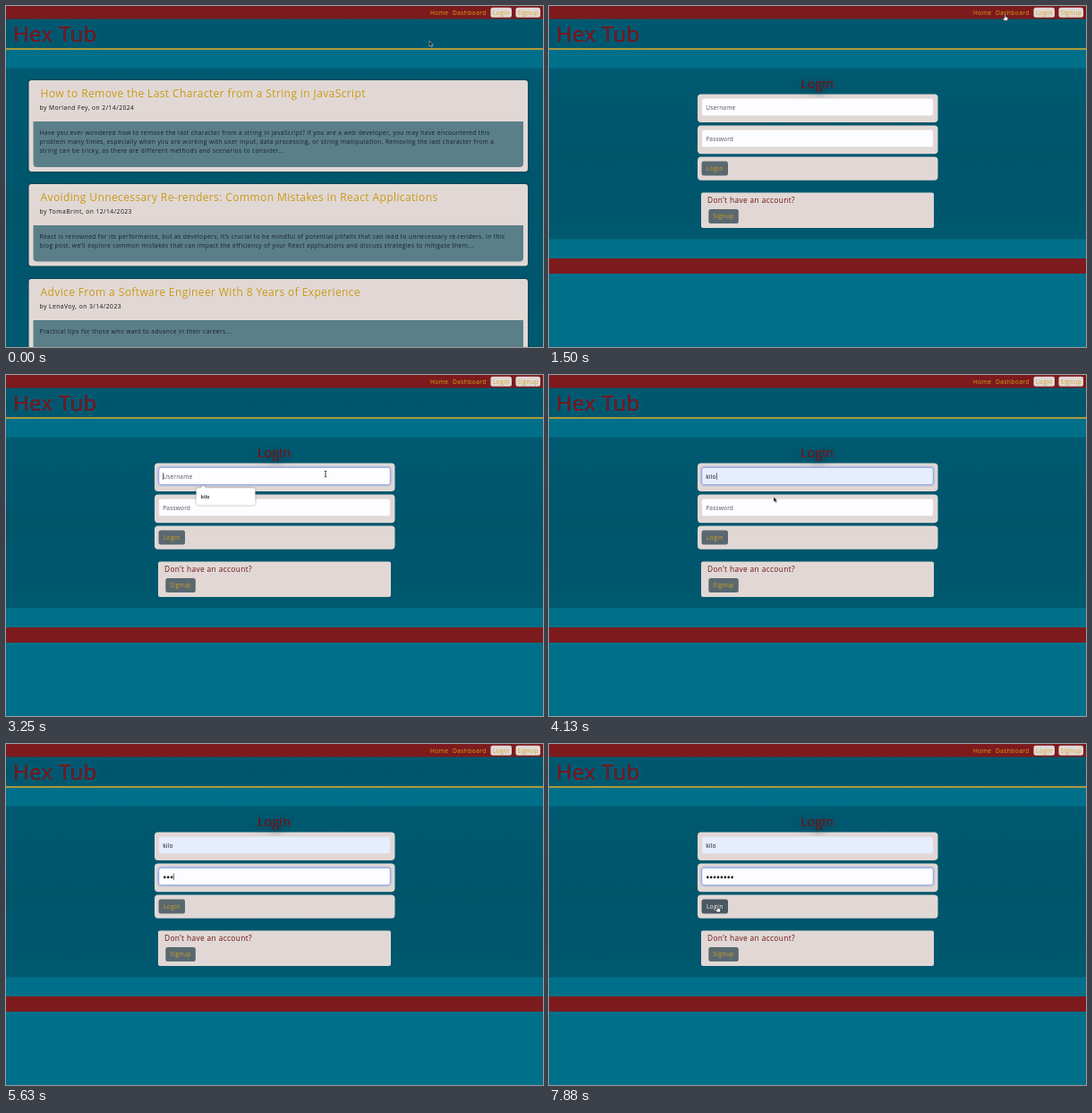
An HTML page for the animation above (8000 ms loop, 600 by 381 pixels).

```html
<!DOCTYPE html>
<html lang="en">
<head>
<meta charset="utf-8">
<title>Blog login</title>
<style>
  html, body { margin: 0; width: 100%; height: 100%; overflow: hidden; background: #00708a; }
  svg { display: block; width: 100%; height: 100%; }
  text { font: 6.67px "Open Sans", "Noto Sans", sans-serif; letter-spacing: .38px; white-space: pre; }
  .gold { fill: #d6a31f; }
  .red { fill: #7d1a1d; }
  .card { fill: #e1d8d5; }
  .post { filter: drop-shadow(0 .8px 1.2px #0008); }
  .title { font-size: 12px; letter-spacing: .39px; fill: #c99a17; }
  .by { letter-spacing: .5px; fill: #111; }
  .body { fill: #14202a; }
  .glow { fill: #88141a; filter: drop-shadow(.6px .6px .6px #0a1a28) drop-shadow(0 0 5px #0a6688); }
  .brand { font-size: 24px; }
  .heading { font-size: 14px; filter: drop-shadow(.3px .3px .4px #0a1a28) drop-shadow(0 2px 4px #00394d); }
  .ask { font-size: 8.33px; fill: #6d1013; }
  .btn { fill: #596870; }
  .field { fill: #fdfdff; stroke: #d5d3d8; stroke-width: .5; }
  .field.filled { fill: #e6edfc; }
  .field.focus { stroke: #8fa6dc; stroke-width: 1; filter: drop-shadow(0 0 1px #7f9be0); }
  .hint { fill: #50565c; letter-spacing: .12px; }
  .value { fill: #111; letter-spacing: .12px; }
  .menu { fill: #fff; filter: drop-shadow(0 .5px 1px #0006); }
  .menuText { font-size: 5.6px; font-weight: 600; letter-spacing: 0; fill: #111; }
  .hover .btn { fill: #4a5862; }
  .hover .gold { fill: #fff; }
  .hover.gold { fill: #5d7f8a; }
</style>
</head>
<body>
<svg viewBox="0 0 600 381" preserveAspectRatio="none">
  <defs>
    <linearGradient id="deep" x2="0" y2="1">
      <stop stop-color="#005a71"/><stop offset=".5" stop-color="#00556b"/><stop offset="1" stop-color="#00596f"/>
    </linearGradient>
  </defs>
  <rect width="600" height="381" fill="#00708a"/>
  <rect y="14" width="600" height="33.5" fill="url(#deep)"/>
  <rect y="47.2" width="600" height="1.6" fill="#d6a52a"/>
  <rect class="red" width="600" height="14.5"/>
  <text class="glow brand" x="8" y="40">Hex Tub</text>
  <text class="gold" x="474" y="9.6">Home</text>
  <text class="gold" id="dash" x="499" y="9.6">Dashboard</text>
  <rect class="card" x="541.5" y="1.7" width="23.5" height="11" rx="2.5"/>
  <text class="gold" x="544" y="9.6">Login</text>
  <rect class="card" x="569.5" y="1.7" width="27.5" height="11" rx="2.5"/>
  <text class="gold" x="571.5" y="9.6">Signup</text>

  <g id="posts"><rect y="69.5" width="600" height="312" fill="url(#deep)"/></g>

  <g id="login">
    <rect y="69.5" width="600" height="191" fill="url(#deep)"/>
    <rect class="red" y="282" width="600" height="17"/>
    <g class="card">
      <rect x="166" y="98.5" width="268.5" height="31.5" rx="4"/>
      <rect x="166" y="133.5" width="268.5" height="31.7" rx="4"/>
      <rect x="166" y="168.5" width="268.5" height="26.3" rx="4"/>
      <rect x="170" y="208.5" width="260" height="39.5" rx="2"/>
    </g>
    <text class="glow heading" x="281" y="91.8">Login</text>
    <rect class="field" id="user" x="170.7" y="103.3" width="258.6" height="19.4" rx="2.5"/>
    <rect class="field" id="pass" x="170.7" y="138.3" width="258.6" height="19.4" rx="2.5"/>
    <text class="hint" id="userHint" x="175.2" y="115.7">Username</text>
    <text class="value" id="userText" x="175.2" y="115.7">kilo</text>
    <text class="hint" id="passHint" x="175.2" y="150.7">Password</text>
    <g id="dots" fill="#111"></g>
    <rect id="caret" width=".6" height="7.5" fill="#111"/>
    <g id="submit">
      <rect class="btn" x="170.5" y="173.5" width="29.5" height="16" rx="2.5"/>
      <text class="gold" x="176" y="184">Login</text>
    </g>
    <rect class="btn" x="178.3" y="227" width="33.5" height="16" rx="2.5"/>
    <text class="gold" x="183.3" y="237.4">Signup</text>
    <text class="ask" x="177" y="220">Don’t have an account?</text>
    <g id="menu">
      <path class="menu" d="M215.5 126.2H217.5L220.5 123.6L223.5 126.2H275.5Q278.5 126.2 278.5 129.2V142.5Q278.5 145.5 275.5 145.5H215.5Q212.5 145.5 212.5 142.5V129.2Q212.5 126.2 215.5 126.2Z"/>
      <text class="menuText" x="217.8" y="138">kilo</text>
    </g>
  </g>

  <g id="cursor" stroke-linejoin="round">
    <path id="arrow" d="M0 0V6L1.4 4.8L2.4 7L3.4 6.5L2.5 4.4H4.2Z" fill="#111" stroke="#eee" stroke-width=".5"/>
    <path id="hand" d="M-.6 .6Q0-.4 .6 .6V3L2.6 3.4Q3.5 3.7 3.4 4.6L2.8 7.4H-.9L-2.4 4.9Q-2.5 3.8-1.5 4.2L-.6 4.9Z" fill="#fff" stroke="#111" stroke-width=".6"/>
    <path id="beam" d="M-1.3-3.2Q0-3.2 0-2.4Q0-3.2 1.3-3.2M0-2.4V2.6M-1.3 3.4Q0 3.4 0 2.6Q0 3.4 1.3 3.4" fill="none" stroke="#111" stroke-width=".8"/>
  </g>
</svg>
<script>
const LOOP = 8000;
const $ = id => document.getElementById(id);
const show = (id, on) => $(id).style.display = on ? '' : 'none';
const mark = (id, name, on) => $(id).classList.toggle(name, on);
const inside = (x, y, left, top, right, bottom) => x > left && x < right && y > top && y < bottom;

const posts = [
  [83, 102, 'How to Remove the Last Character from a String in JavaScript', 'by Morland Fey, on 2/14/2024', [
    'Have you ever wondered how to remove the last character from a string in JavaScript? If you are a web developer, you may have encountered this',
    'problem many times, especially when you are working with user input, data processing, or string manipulation. Removing the last character from a',
    'string can be tricky, as there are different methods and scenarios to consider...']],
  [199, 91.5, 'Avoiding Unnecessary Re-renders: Common Mistakes in React Applications', 'by TomaBrint, on 12/14/2023', [
    'React is renowned for its performance, but as developers, it’s crucial to be mindful of potential pitfalls that can lead to unnecessary re-renders. In this',
    'blog post, we’ll explore common mistakes that can impact the efficiency of your React applications and discuss strategies to mitigate them...']],
  [305, 90, 'Advice From a Software Engineer With 8 Years of Experience', 'by LenaVoy, on 3/14/2023', [
    'Practical tips for those who want to advance in their careers...']]
];

$('posts').innerHTML += posts.map(([y, h, title, by, lines]) => `
  <rect class="card post" x="25.5" y="${y}" width="557.5" height="${h}" rx="3"/>
  <path d="M30.5 ${y + 46}H578V${y + h - 9}q0 4-4 4H34.5q-4 0-4-4Z" fill="#5b7f89"/>
  <text class="title" x="38.5" y="${y + 19.3}">${title}</text>
  <text class="by" x="37.5" y="${y + 33}">${by}</text>
  ${lines.map((s, i) => `<text class="body" x="37.5" y="${y + 60.6 + i * 10}">${s}</text>`).join('')}`).join('');

$('dots').innerHTML = Array.from({length: 8}, (_, i) =>
  `<circle cx="${177.3 + i * 3.9}" cy="148.9" r="1.3"/>`).join('');

// Pointer stops: time, x, y
const path = [
  [0, 473, 39], [1000, 509.5, 9], [2000, 509.5, 9], [2750, 357, 110.5], [3300, 357, 110.5],
  [3800, 251, 136], [4400, 251, 136], [4750, 240, 148], [7000, 240, 148], [7450, 188.5, 180.5], [LOOP, 188.5, 180.5]
];

function pointerAt(t) {
  const i = path.findIndex(p => p[0] > t);
  const [t0, x0, y0] = path[i - 1], [t1, x1, y1] = path[i];
  const u = (t - t0) / (t1 - t0), e = u * u * (3 - 2 * u);
  return [x0 + (x1 - x0) * e, y0 + (y1 - y0) * e];
}

function draw(t) {
  const onLogin = t >= 1500;
  show('posts', !onLogin);
  show('login', onLogin);

  const [x, y] = pointerAt(t);
  const menuOpen = t >= 3000 && t < 3900;
  const overNav = inside(x, y, 474, 0, 597, 14);
  const overSubmit = onLogin && inside(x, y, 170, 173, 200, 190);
  const overMenu = menuOpen && inside(x, y, 212, 126, 279, 146);
  const overField = onLogin && !overMenu &&
    (inside(x, y, 170, 103, 430, 123) || inside(x, y, 170, 138, 430, 158));
  const hand = overNav || overSubmit;
  $('cursor').setAttribute('transform', `translate(${x} ${y})`);
  show('cursor', t < 5250 || t >= 7000);
  show('hand', hand);
  show('beam', overField);
  show('arrow', !hand && !overField);
  mark('dash', 'hover', !onLogin && overNav);
  mark('submit', 'hover', overSubmit);

  const filled = t >= 3900, onPass = t >= 4800, focused = t >= 2900;
  const typed = Math.max(0, Math.min(8, Math.floor((t - 5250) / 125)));
  show('menu', menuOpen);
  show('userHint', !filled);
  show('userText', filled);
  show('passHint', !typed);
  mark('user', 'filled', filled);
  mark('user', 'focus', focused && !onPass);
  mark('pass', 'focus', onPass);
  [...$('dots').children].forEach((dot, i) => dot.style.display = i < typed ? '' : 'none');

  const lastInput = typed ? 5250 + typed * 125 : onPass ? 4800 : filled ? 3900 : 2900;
  show('caret', focused && (t - lastInput) % 1000 < 500);
  $('caret').setAttribute('x', onPass ? 175.2 + typed * 3.9 : filled ? 187.2 : 175);
  $('caret').setAttribute('y', onPass ? 144.6 : 109.4);
}

function tick() {
  draw(performance.now() % LOOP);
  requestAnimationFrame(tick);
}
tick();
</script>
</body>
</html>
```
